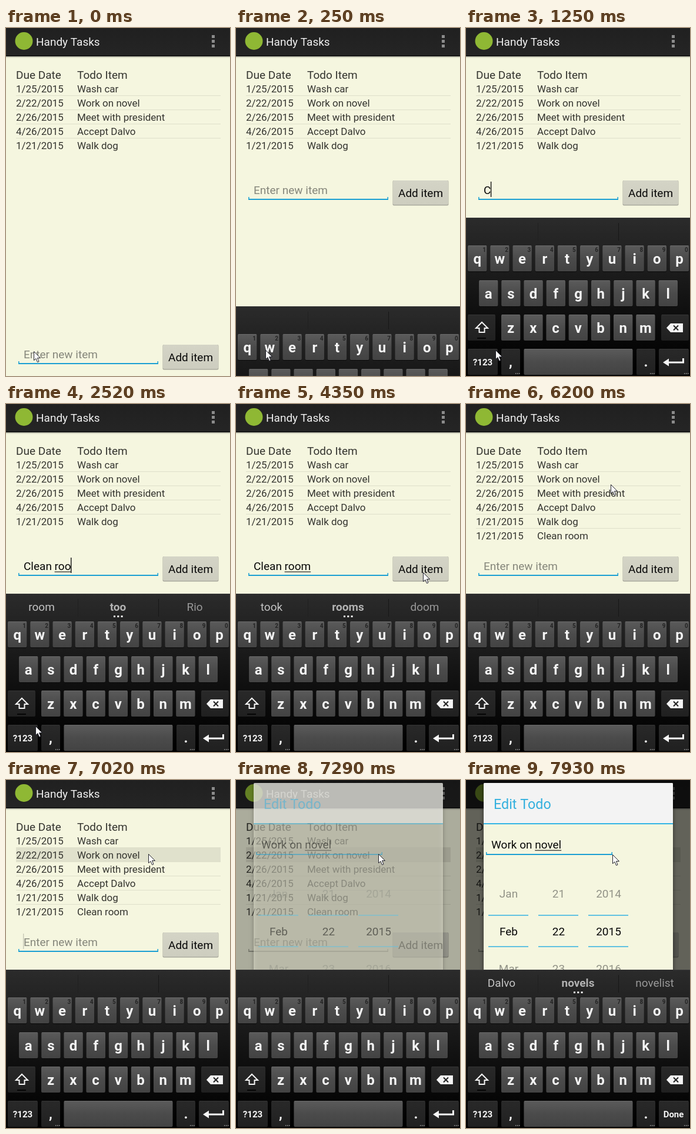
An HTML page with a canvas that plays this animation: 381 px wide and 589 px high, repeating every 8 s.

```html
<!DOCTYPE html>
<html lang="en">
<head>
<meta charset="utf-8">
<title>Task list</title>
<style>
html, body { margin: 0; width: 100%; height: 100%; overflow: hidden; background: #f5f6df; }
canvas { display: block; }
</style>
</head>
<body>
<canvas id="stage" width="381" height="589"></canvas>
<script>
const ctx = document.getElementById('stage').getContext('2d');
const LOOP = 8000, PAPER = '#f5f6df', BLUE = '#1b9fd3';
const PITCH = 23.9, LIFT = 278;

const todos = [
  ['1/25/2015', 'Wash car'], ['2/22/2015', 'Work on novel'],
  ['2/26/2015', 'Meet with president'], ['4/26/2015', 'Accept Dalvo'],
  ['1/21/2015', 'Walk dog'], ['1/21/2015', 'Clean room']
];

// time, committed text, word being composed, suggestions
const typing = [
  [0, '', ''],
  [1250, 'C', ''],
  [1375, '', 'Cl', ['Cl', 'Clay', 'Club']],
  [1500, '', 'Cle', ['Clean', 'Clear', 'Clerk']],
  [1630, '', 'Clea', ['Clean', 'Clear', 'Cleat']],
  [1750, '', 'Clean', ['Clear', 'Clean', 'Cleans']],
  [1880, 'Clean ', ''],
  [2280, 'Clean ', 'r', ['are', 'r', 'for']],
  [2400, 'Clean ', 'ro', ['to', 'so', 'do']],
  [2520, 'Clean ', 'roo', ['room', 'too', 'Rio']],
  [2670, 'Clean ', 'room', ['took', 'rooms', 'doom']],
  [4620, '', '']
];

// start, end, number of steps, destination
const moves = [
  [250, 250, 1, 50, 545], [2940, 3640, 6, 330, 235], [3780, 3780, 1, 318, 285],
  [4620, 4620, 1, 318, 281], [5350, 6200, 7, 246, 136], [6350, 6740, 4, 242, 125],
  [7810, 7810, 1, 246, 125], [7930, 7930, 1, 249, 126]
];
const caretToggles = [540, 820, 1250, 3220, 3640, 4200, 4740, 5200, 5640, 6200, 6740];

const latest = (list, t) => list.filter(item => item[0] <= t).pop();

function box(x, y, w, h, fill) {
  ctx.fillStyle = fill;
  ctx.fillRect(x, y, w, h);
}

function text(str, x, y, size, fill, align = 'left', weight = 400) {
  ctx.font = `${weight} ${size}px Roboto, sans-serif`;
  ctx.textAlign = align;
  ctx.fillStyle = fill;
  ctx.fillText(str, x, y);
}

function fade(y0, y1, ...colors) {
  const g = ctx.createLinearGradient(0, y0, 0, y1);
  colors.forEach((c, i) => g.addColorStop(i / (colors.length - 1), c));
  return g;
}

function shape(points, fill, stroke, width = 1) {
  ctx.beginPath();
  points.forEach(([x, y]) => ctx.lineTo(x, y));
  ctx.closePath();
  if (fill) { ctx.fillStyle = fill; ctx.fill(); }
  if (stroke) { ctx.strokeStyle = stroke; ctx.lineWidth = width; ctx.stroke(); }
}

function rounded(x, y, w, h, r, fill) {
  ctx.beginPath();
  ctx.roundRect(x, y, w, h, r);
  ctx.fillStyle = fill;
  ctx.fill();
}

function underline(x0, x1, y, color) {
  box(x0, y, x1 - x0, 2, color);
  box(x0, y - 3, 1.5, 3, color);
  box(x1 - 1.5, y - 3, 1.5, 3, color);
}

// Draws committed plus underlined text and returns the caret position.
function entry(done, word, x, y) {
  text(done, x, y, 19, '#080808');
  const wordX = x + ctx.measureText(done).width;
  text(word, wordX, y, 19, '#080808');
  const end = wordX + ctx.measureText(word).width;
  if (word) box(wordX, y + 2.5, end - wordX, 1.2, '#222');
  return end;
}

function actionBar() {
  box(0, 0, 381, 48, fade(0, 48, '#202020', '#252525'));
  box(0, 46, 381, 2, '#171717');
  box(0, 48, 381, 3, fade(48, 51, 'rgba(0,0,0,.28)', 'rgba(0,0,0,0)'));
  ctx.beginPath();
  ctx.arc(30.5, 22, 15, 0, Math.PI * 2);
  ctx.fillStyle = '#8fb834';
  ctx.fill();
  text('Handy Tasks', 51, 30, 19, '#f1f1f1');
  for (let i = 0; i < 3; i++) box(350, 12 + i * 8, 5, 5, '#8b8b8b');
}

function todoList(t) {
  text('Due Date', 17, 86, 19, '#34342f');
  text('Todo Item', 121, 86, 19, '#34342f');
  const count = t >= 4620 ? 6 : 5;
  if (t >= 7020) box(17, 114, 348, 24, '#e0e1cc');
  todos.slice(0, count).forEach(([date, item], i) => {
    const y = 109 + i * PITCH;
    text(date, 17, y, 17, '#34342f');
    text(item, 121, y, 17, '#34342f');
    if (i < count - 1) box(17, Math.round(y + 5), 348, 1, '#dedfca');
  });
}

function inputRow(t, state) {
  const y = t < 250 ? LIFT : 0;
  const [, done, word] = state;
  let caretX = 29.5;
  if (done || word) caretX = entry(done, word, 30, 281 + y);
  else text('Enter new item', 30, 281 + y, 19, '#85867b');
  const focused = t < 7170;
  underline(21, 259, 289 + y, focused ? BLUE : '#a9aa9b');
  const on = caretToggles.filter(c => c <= t).length % 2;
  if (on && focused) box(caretX - .5, 260, 1.4, 26, t >= 7020 ? '#c8c9b6' : '#111');

  const pressed = t >= 4500 && t < 4740;
  rounded(266.5, 258 + y, 95, 42.5, 2, '#aaaa9e');
  rounded(267, 258 + y, 94, 41, 2, pressed ? '#c2c3b6' : fade(258 + y, 299 + y, '#d4d4c6', '#cdcdbf'));
  text('Add item', 276, 286 + y, 19, '#080808');
}

function key(x, y, w, dark) {
  rounded(x, y + 1, w, 44, 2, '#080808');
  rounded(x, y, w, 44, 2, dark ? fade(y, y + 44, '#292929', '#202020') : fade(y, y + 44, '#5b5b5b', '#4b4b4b', '#434343'));
  box(x + 1, y, w - 2, 1, dark ? '#363636' : '#6a6a6a');
}

function letterRow(letters, x, y, hints) {
  [...letters].forEach((ch, i) => {
    const left = x + i * 38.2;
    key(left, y, 32.4);
    text(ch, left + 16.2, y + 31, 24, '#f5f5f5', 'center', 700);
    if (hints) text((i + 1) % 10, left + 28, y + 11, 10, '#242424', 'center', 700);
  });
}

function moreDots(x) {
  for (let i = 0; i < 3; i++) box(x + i * 3, 584, 1.5, 1.5, '#9a9a9a');
}

function keyIcons() {
  shape([[27, 498], [37, 508], [31.5, 508], [31.5, 515], [22.5, 515], [22.5, 508], [17, 508]], null, '#f4f4f4', 2);
  box(19, 524, 15, 2, '#050505');
  shape([[341, 507.5], [348, 500], [369, 500], [369, 515], [348, 515]], '#f4f4f4');
  ctx.strokeStyle = '#222';
  ctx.lineWidth = 2;
  ctx.beginPath();
  ctx.moveTo(353, 503.5); ctx.lineTo(361, 511.5);
  ctx.moveTo(361, 503.5); ctx.lineTo(353, 511.5);
  ctx.stroke();
}

function suggestionBar(words) {
  box(122, 330, 1, 30, '#202020');
  box(259, 330, 1, 30, '#171717');
  if (!words) return;
  text(words[0], 60.5, 350, 19, '#c4c4c4', 'center');
  text(words[1], 190.5, 350, 19, '#b2b2b2', 'center', 700);
  text(words[2], 321, 350, 19, '#999', 'center');
  for (let i = 0; i < 3; i++) box(183 + i * 6.3, 358, 3, 3, '#f0f0f0');
}

function keyboard(words, doneKey) {
  box(0, 321, 381, 268, fade(321, 589, '#2b2b2b', '#1c1c1c', '#0b0b0b', '#000'));
  box(0, 321, 381, 1, '#3a3a3a');
  suggestionBar(words);
  letterRow('qwertyuiop', 3, 368, true);
  letterRow('asdfghjkl', 22, 427);
  letterRow('zxcvbnm', 60, 485);
  key(3, 485, 47, true);
  key(332, 485, 47, true);
  key(3, 543, 51, true);
  key(60, 543, 32, true);
  key(98.5, 543, 185, false);
  key(290, 543, 32, true);
  key(328, 543, 51, true);
  keyIcons();
  text('?123', 28.5, 571, 15, '#f5f5f5', 'center', 700);
  text(',', 76, 573, 24, '#f5f5f5', 'center', 700);
  text('.', 306, 573, 24, '#f5f5f5', 'center', 700);
  [84, 313, 371].forEach(moreDots);
  if (doneKey) {
    text('Done', 353, 571, 15, '#f5f5f5', 'center', 700);
  } else {
    shape([[335, 566], [345, 559.5], [345, 564.5], [368, 564.5], [368, 559], [371, 559],
      [371, 567.5], [345, 567.5], [345, 572.5]], '#f5f5f5');
  }
}

function dialog(t) {
  const alpha = t < 7300 ? .5 : 1;
  box(0, 0, 381, 589, `rgba(0,0,0,${.6 * alpha})`);
  ctx.save();
  ctx.globalAlpha = alpha;
  ctx.shadowColor = 'rgba(0,0,0,.55)';
  ctx.shadowBlur = 7;
  rounded(30, 5, 322, 420, 2, PAPER);
  ctx.shadowColor = 'transparent';
  rounded(30, 5, 322, 68, [2, 2, 0, 0], '#f3f3f3');
  box(30, 73, 322, 2, '#33b5e5');
  text('Edit Todo', 47, 48.5, 23.3, '#33b0de');

  const caretX = entry('Work on ', 'novel', 43, 116);
  underline(34, 249, 125, BLUE);
  if (t >= 7410 && t < 7930) box(caretX, 96, 1.4, 26, '#111');

  const columns = [['Jan', 'Feb', 'Mar'], ['21', '22', '23'], ['2014', '2015', '2016']];
  columns.forEach((values, c) => {
    const x = 72 + c * 85;
    values.forEach((v, i) => text(v, x + .5, 199 + i * 63.5, 19, i === 1 ? '#080808' : '#929387', 'center'));
    box(x - 34, 228, 68, 2, '#62c2e1');
    box(x - 34, 281, 68, 2, '#62c2e1');
  });
  ctx.restore();
}

function pointer(t) {
  let x = 47, y = 547;
  for (const [start, end, steps, toX, toY] of moves) {
    if (t < start) break;
    const gap = (end - start) / Math.max(1, steps - 1);
    const step = gap ? Math.min(steps, Math.floor((t - start) / gap + 1e-6) + 1) : steps;
    const p = step / steps, k = p * p * (3 - 2 * p);
    x += (toX - x) * k;
    y += (toY - y) * k;
  }
  ctx.save();
  ctx.translate(Math.round(x) + .5, Math.round(y) + .5);
  shape([[0, 0], [0, 15], [3.5, 12], [6, 18], [8.5, 17], [6, 11], [11, 11]], '#fff', '#22222c');
  ctx.restore();
}

function draw(t) {
  const state = latest(typing, t);
  const editing = t >= 7170;
  box(0, 0, 381, 589, PAPER);
  actionBar();
  todoList(t);
  inputRow(t, state);
  if (editing) dialog(t);
  if (t >= 250) {
    ctx.save();
    ctx.translate(0, t < 400 ? 150 : t < 540 ? 30 : 0);
    keyboard(t >= 7410 ? ['Dalvo', 'novels', 'novelist'] : state[3], t >= 7300);
    ctx.restore();
  }
  pointer(t);
}

const begin = performance.now();
function tick() {
  draw((performance.now() - begin) % LOOP);
  requestAnimationFrame(tick);
}
tick();
</script>
</body>
</html>
```
